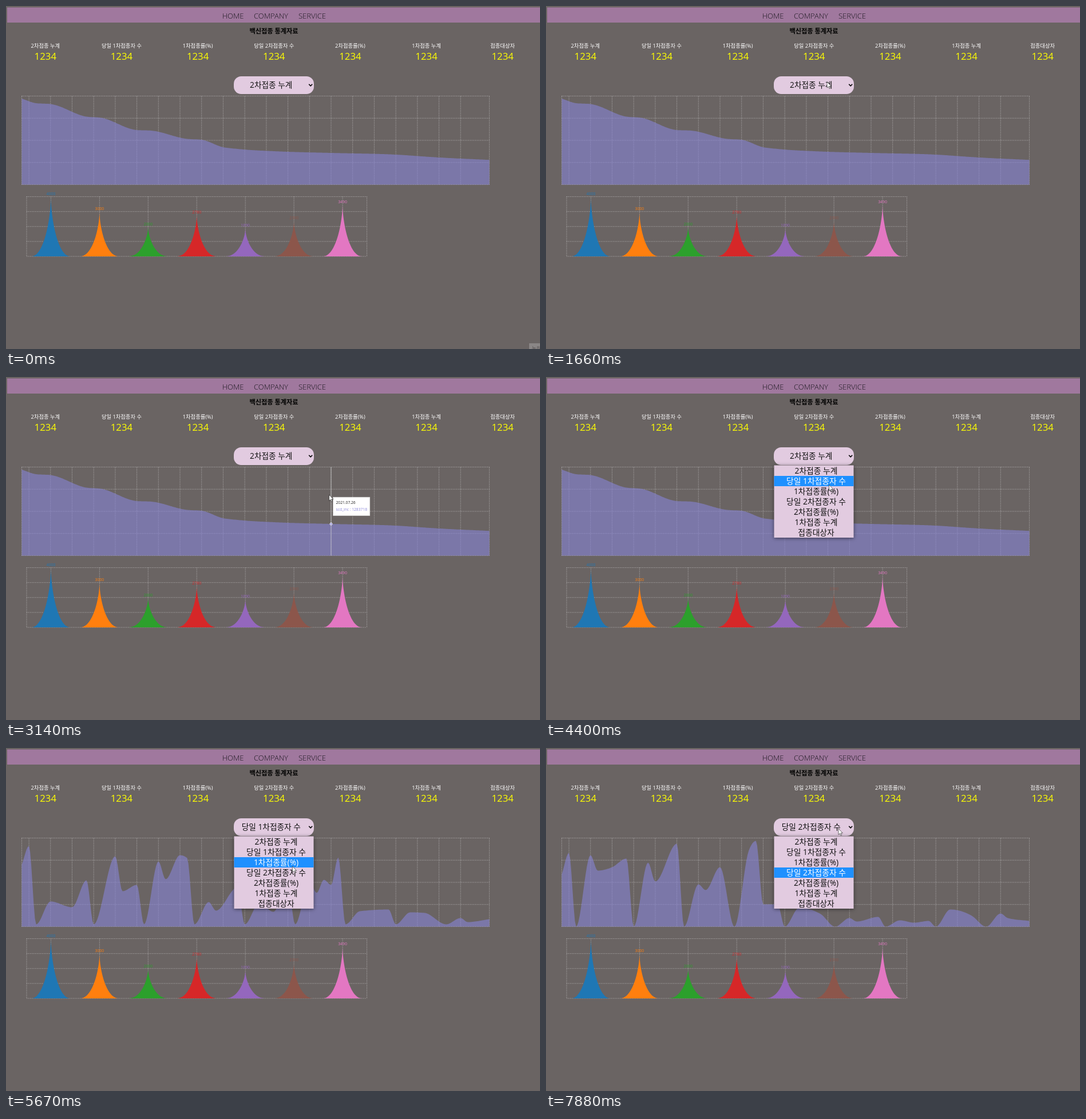
Write an HTML page that moves like this. It is 933 px wide and 600 px high and loops after 8000 ms.

```html
<!DOCTYPE html>
<html lang="ko">
<head>
<meta charset="utf-8">
<title>백신접종 통계자료</title>
<style>
  html, body { margin: 0; width: 100%; height: 100%; overflow: hidden; background: #6a6463; }
  svg { display: block; width: 933px; height: 600px; }
  text { font-family: "Open Sans", "Noto Sans CJK KR", sans-serif; white-space: pre; }
  .mid { text-anchor: middle; }
  .grid { stroke: #ccc; stroke-width: .6; stroke-dasharray: 1.5 1.5; fill: none; }
</style>
</head>
<body>
<svg id="stage" viewBox="0 0 933 600" xmlns="http://www.w3.org/2000/svg"></svg>
<script>
const stage = document.getElementById('stage');

function set(node, attrs) {
  for (const k in attrs) node.setAttribute(k, attrs[k]);
}
function el(tag, attrs, parent = stage, text) {
  const node = document.createElementNS('http://www.w3.org/2000/svg', tag);
  set(node, attrs);
  if (text !== undefined) node.textContent = text;
  parent.appendChild(node);
  return node;
}
function label(x, y, size, fill, text, parent = stage, weight = 400) {
  return el('text', { x, y, 'font-size': size, fill, 'font-weight': weight, class: 'mid' }, parent, text);
}
const show = (node, on) => node.setAttribute('visibility', on ? 'visible' : 'hidden');
const range = (n, f) => Array.from({ length: n }, (_, i) => f(i));

const LOOP = 8000;
const OPTIONS = ['2차접종 누계', '당일 1차접종자 수', '1차접종률(%)', '당일 2차접종자 수',
  '2차접종률(%)', '1차접종 누계', '접종대상자'];
const LEFT = 27.5, RIGHT = 844.5, TOP = 157.5, BASE = 312.5, DAYS = 65;
const STEP = (RIGHT - LEFT) / DAYS;

// Monotone cubic through [day, height] knots
function curve(knots) {
  const slope = i => (knots[i + 1][1] - knots[i][1]) / (knots[i + 1][0] - knots[i][0]);
  const last = knots.length - 1;
  const tan = knots.map((_, i) => {
    if (i === 0 || i === last) return slope(i && i - 1);
    const a = slope(i - 1), b = slope(i);
    const wa = knots[i][0] - knots[i - 1][0], wb = knots[i + 1][0] - knots[i][0];
    const mean = Math.abs(a * wb + b * wa) / (wa + wb) / 2;
    return (Math.sign(a) + Math.sign(b)) * Math.min(Math.abs(a), Math.abs(b), mean);
  });
  return day => {
    let i = 0;
    while (i < last - 1 && knots[i + 1][0] <= day) i++;
    const [d0, h0] = knots[i], [d1, h1] = knots[i + 1];
    const w = d1 - d0, p = (day - d0) / w, q = 1 - p;
    return q * q * (1 + 2 * p) * h0 + p * p * (1 + 2 * q) * h1 + p * q * w * (q * tan[i] - p * tan[i + 1]);
  };
}

// Daily counts drop once a week
const DIPS = [2, ...range(8, i => 10 + 7 * i)];
const weekly = (low, knots) => curve([...knots, ...DIPS.map(d => [d, low])].sort((a, b) => a[0] - b[0]));

const SERIES = {
  0: { key: 'scd_inc', value: h => h * 1283718 / 55.5, height: curve([
    [0, 150.5], [2, 142.5], [4, 141], [9, 119], [11, 117], [16, 95.5], [18, 94.5], [23, 80], [25, 78.5],
    [28, 65.5], [30, 62.5], [36, 58], [43, 55.5], [52, 52.5], [58, 47.5], [65, 43.3]]) },
  1: { key: 'fir_inc1', value: h => h * 77877 / 75.5, height: weekly(4, [
    [0, 108], [1, 141], [4, 44], [7, 34], [9, 81], [13, 123], [14, 62], [16, 73], [19, 114], [20, 83],
    [22, 125], [23, 120], [26, 43], [27, 28], [30, 69], [33, 41], [35, 26], [37, 75.5], [40, 78.5],
    [41, 59], [42, 82], [43, 73], [44, 121], [47, 27], [51, 30], [54, 25], [56, 24], [61, 15], [62, 8], [65, 13]]) },
  3: { key: 'scd_inc1', value: h => h * 5100 + 68, height: weekly(0, [
    [0, 91], [1, 129], [4, 125], [5, 98], [7, 104], [9, 119], [12, 112], [13, 79], [16, 145], [19, 74],
    [20, 64], [22, 104], [26, 133], [27, 150], [28, 39], [30, 39], [33, 33], [36, 22], [40, 15], [41, 9],
    [44, 17], [47, 11], [49, 7], [51, 10], [54, 30], [57, 19], [61, 23], [62, 15], [65, 10]]) }
};

function areaPath(height) {
  const top = range(DAYS * 6 + 1, i =>
    `L${(LEFT + i / 6 * STEP).toFixed(2)} ${(BASE - height(i / 6)).toFixed(2)}`);
  return `M${LEFT} ${BASE}${top.join('')}L${RIGHT} ${BASE}Z`;
}

function grid(x0, x1, y0, y1, columns) {
  let d = '';
  for (let i = 0; i <= 4; i++) d += `M${x0} ${y0 + (y1 - y0) * i / 4}H${x1}`;
  for (const x of [x0, ...columns, x1]) d += `M${x} ${y0}V${y1}`;
  el('path', { class: 'grid', d });
}

// Header
el('rect', { width: 933, height: 600, fill: '#6a6463' });
el('rect', { x: 2, y: 2.5, width: 931, height: 26.5, fill: '#a0789e' });
[['HOME', 396.5], ['COMPANY', 463], ['SERVICE', 535]].forEach(([s, x]) =>
  label(x, 21.5, 13, '#1c1820', s, stage, 300));
label(468, 48, 11.2, '#000', '백신접종 통계자료', stage, 600);
OPTIONS.forEach((s, i) => {
  const x = 68.8 + i * 133.15;
  label(x, 73, 9.3, '#fff', s);
  label(x, 94, 16.8, '#ff0', '1234');
});

// Area chart
grid(LEFT, RIGHT, TOP, BASE, range(21, i => LEFT + (1 + 3 * i) * STEP));
const area = el('path', { fill: '#8884d8', 'fill-opacity': .6 });
for (const k in SERIES) SERIES[k].path = areaPath(SERIES[k].height);

// Bar chart
const BAR = 594.5 / 7, FLOOR = 438;
const BARS = [[4000, '#1f77b4'], [3000, '#ff7f0e'], [2000, '#2ca02c'], [2780, '#d62728'],
  [1890, '#9467bd'], [2390, '#8c564b'], [3490, '#e377c2']];
grid(36, 630.5, 333.5, FLOOR, BARS.map((_, i) => 36 + (i + .5) * BAR));
BARS.forEach(([v, fill], i) => {
  const h = v * 104.5 / 4000, w = BAR * .8, y = FLOOR - h;
  const x = 36 + i * BAR + BAR * .1, c = x + w / 2, k = y + h / 3;
  el('path', { fill, d: `M${x},${FLOOR} C${x + w / 3},${FLOOR} ${c},${k} ${c},${y}
    C${c},${k} ${x + 2 * w / 3},${FLOOR} ${x + w},${FLOOR} Z` });
  label(c, y - 2.2, 6.9, fill, v);
});

// Tooltip
const tip = el('g', {});
const guide = el('path', { stroke: '#ccc', 'stroke-width': .8 }, tip);
const dot = el('circle', { r: 1.9, fill: '#8884d8', stroke: '#fff', 'stroke-width': 1 }, tip);
const card = el('g', {}, tip);
const cardBox = el('rect', { height: 32.5, fill: '#fff', stroke: '#ccc', 'stroke-width': .6 }, card);
const cardDate = el('text', { x: 5, y: 12.3, 'font-size': 6.7, fill: '#222' }, card);
const cardValue = el('text', { x: 5, y: 24, 'font-size': 6.7, fill: '#8884d8' }, card);

// Select
el('rect', { x: 398, y: 123, width: 140, height: 31, rx: 13, fill: '#e2cbe0' });
const chosen = label(463.3, 143, 13.7, '#111', '');
el('path', { d: 'M529.2 136.8L532.2 139.9L535.2 136.8', fill: 'none', stroke: '#000', 'stroke-width': 1.6 });

const menu = el('g', { style: 'filter:drop-shadow(0 1px 3px rgba(0,0,0,.55))' });
el('rect', { x: 398.5, y: 154.5, width: 139, height: 126.5, fill: '#e2cbe0' }, menu);
const mark = el('rect', { x: 398.5, width: 139, height: 18, fill: '#1e90ff' }, menu);
const rows = OPTIONS.map((s, i) => label(472, 169 + i * 18, 13.8, '#111', s, menu));

// Corner hint
const hint = el('g', {});
el('rect', { x: 914, y: 590, width: 19, height: 10, fill: '#8a8686' }, hint);
el('text', { x: 918.5, y: 603, 'font-size': 9, fill: '#565151' }, hint, '녹화');

const pointer = el('path', { d: 'M0 0V10.6L2.4 8.4L4 12.1L5.7 11.4L4.1 7.8H7.4Z',
  fill: '#fff', stroke: '#111', 'stroke-width': .6 });

// Pointer moves: from, until, x, y
const ENTER = [932, 598];
const MOVES = [[930, 1660, 491, 132.5], [2130, 2930, 564.5, 206], [3440, 3800, 505, 130],
  [3940, 4200, 495, 204], [4280, 4400, 494.5, 188.5], [4680, 5000, 497, 140],
  [5270, 5810, 501, 220], [6610, 7070, 511, 141]];
// Tooltip visits: from, until, x, y where the card starts
const VISITS = [[1350, 1560, 665, 313], [2440, 3655, 535, 185], [4680, 4900, 573, 195], [6540, 6940, 497, 164]];
const MENUS = [[3800, 4470], [5330, 6540], [7740, LOOP]];

const mix = (a, b, p) => a + (b - a) * p;
const current = (spans, t) => spans.find(([from, until]) => t >= from && t < until);

function pointerAt(t) {
  let [x, y] = ENTER;
  for (const [from, until, tx, ty] of MOVES) {
    const p = Math.max(0, Math.min(1, (t - from) / (until - from)));
    const eased = p * p * (3 - 2 * p);
    x = mix(x, tx, eased);
    y = mix(y, ty, eased);
  }
  return [x, y];
}

function drawTip(t, [from, , x0, y0], x, y, series) {
  const day = Math.max(0, Math.min(DAYS, Math.round((x - LEFT) / STEP)));
  const px = LEFT + day * STEP, h = series.height(day);
  set(guide, { d: `M${px} ${TOP}V${BASE}` });
  set(dot, { cx: px, cy: BASE - h });
  cardDate.textContent = new Date(Date.UTC(2021, 8, 7 - day)).toISOString().slice(0, 10).replace(/-/g, '.');
  cardValue.textContent = `${series.key} : ${Math.round(series.value(h))}`;
  const wide = Math.max(cardDate.getComputedTextLength(), cardValue.getComputedTextLength());
  set(cardBox, { width: wide + 9.8 });
  const p = 1 - Math.exp((from - t) / 160);
  set(card, { transform: `translate(${mix(x0, px + 4, p)} ${mix(y0, y + 4.5, p)})` });
}

function draw(t) {
  const sel = t < 4470 ? 0 : t < 6540 ? 1 : 3;
  const [x, y] = pointerAt(t);

  set(area, { d: SERIES[sel].path });
  chosen.textContent = OPTIONS[sel];

  const open = current(MENUS, t);
  show(menu, open);
  if (open) {
    const hot = y >= 155 ? Math.floor((y - 155) / 18) : sel;
    set(mark, { y: 155 + hot * 18 });
    rows.forEach((r, i) => set(r, { fill: i === hot ? '#fff' : '#111' }));
  }

  const visit = current(VISITS, t);
  show(tip, visit);
  if (visit) drawTip(t, visit, x, y, SERIES[sel]);

  show(pointer, t >= MOVES[0][0]);
  set(pointer, { transform: `translate(${x} ${y})` });
  set(hint, { opacity: Math.max(0, Math.min(1, (670 - t) / 200)) });
}

const start = performance.now();
function tick() {
  draw((performance.now() - start) % LOOP);
  requestAnimationFrame(tick);
}
draw(0);
requestAnimationFrame(tick);
</script>
</body>
</html>
```
